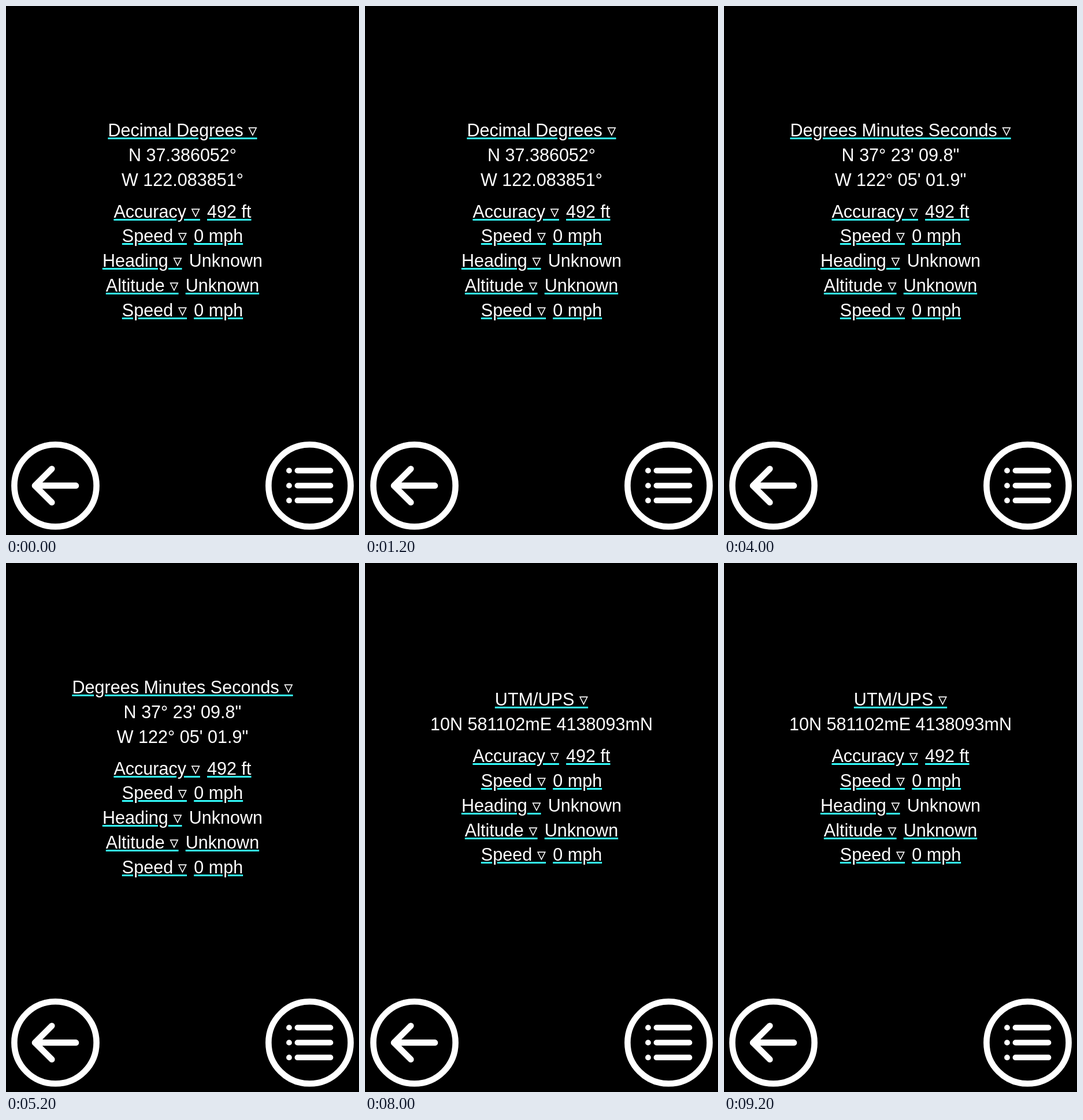
Write an HTML page that moves like this. It is 611x917 px and loops after 10000 ms.

```html
<!DOCTYPE html>
<html lang="en">
<head>
<meta charset="utf-8">
<title>Position readout</title>
<style>
  html, body { margin: 0; width: 100%; height: 100%; overflow: hidden; background: #000; }
  #stage { position: relative; width: 611px; height: 917px; color: #fff;
    font: 30.55px/42px "Liberation Sans", Arial, "DejaVu Sans", sans-serif; }
  .row { position: absolute; left: 0; width: 611px; text-align: center; white-space: pre; }
  .link { text-decoration: underline #3ff; }
  .row span + span { margin-left: .4em; }
  svg { position: absolute; left: 0; top: 0; fill: none; stroke: #fff; stroke-width: 10.6;
    stroke-linecap: round; stroke-linejoin: round; }
</style>
</head>
<body>
<div id="stage">
  <div id="readout"></div>
  <svg width="611" height="917">
    <circle cx="85.5" cy="831.4" r="71.1"/>
    <path d="M121 831.4H50M79.3 802.3L50 831.4L79.3 860.5"/>
    <circle cx="525.5" cy="831.4" r="71.1"/>
    <path stroke-width="9.8" d="M490 805.4h0M504.5 805.4h57M490 831.4h0M504.5 831.4h57M490 857.2h0M504.5 857.2h57"/>
  </svg>
</div>
<script>
const HOLD = 2000, LINE = 42.77, GAP = 12.22;
const MIDDLE = 397.18; // middle of the text block, measured on baselines
const ASCENT = 32;     // row top to baseline

const formats = [
  ["Decimal Degrees", "N 37.386052°", "W 122.083851°"],
  ["Degrees Decimal Minutes", "N 37° 23.163'", "W 122° 05.031'"],
  ["Degrees Minutes Seconds", "N 37° 23' 09.8\"", "W 122° 05' 01.9\""],
  ["MGRS", "10S EG 81102 38093"],
  ["UTM/UPS", "10N 581102mE 4138093mN"]
];

const link = text => `<span class="link">${text}</span>`;
const menu = text => link(text + " ▿");
const plain = text => `<span>${text}</span>`;

const details = [
  menu("Accuracy") + link("492 ft"),
  menu("Speed") + link("0 mph"),
  menu("Heading") + plain("Unknown"),
  menu("Altitude") + link("Unknown"),
  menu("Speed") + link("0 mph")
];

function render([title, ...coords]) {
  const rows = [menu(title), ...coords.map(plain), ...details];
  const first = MIDDLE - rows.length * LINE / 2;
  return rows.map((html, i) => {
    const baseline = first + i * LINE + (i > coords.length ? GAP : 0);
    return `<div class="row" style="top:${Math.round(baseline) - ASCENT}px">${html}</div>`;
  }).join("");
}

const readout = document.getElementById("readout");
const start = performance.now();
let shown = -1;

function tick() {
  const index = Math.floor((performance.now() - start) / HOLD) % formats.length;
  if (index !== shown) {
    shown = index;
    readout.innerHTML = render(formats[index]);
  }
  requestAnimationFrame(tick);
}
tick();
</script>
</body>
</html>
```
